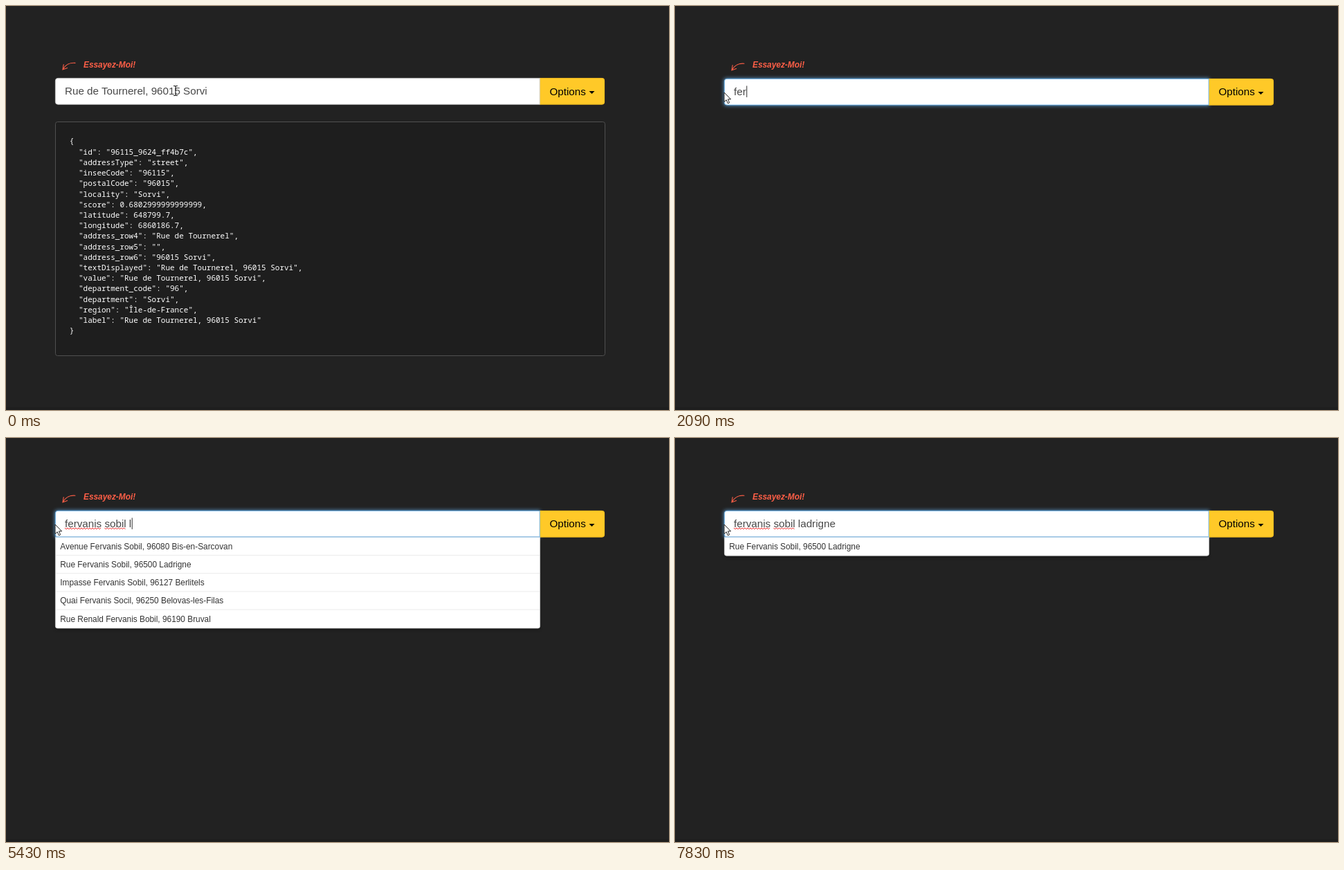
These frames come from a looping animation (958x584 px, 8000 ms). An HTML page:

```html
<!DOCTYPE html>
<html lang="fr">
<head>
<meta charset="utf-8">
<title>Recherche d'adresse</title>
<style>
html, body { margin: 0; width: 100%; height: 100%; overflow: hidden; background: #222; }
svg { display: block; width: 958px; height: 584px; }
text { font-family: "Liberation Sans", Arial, sans-serif; white-space: pre; }
.field { font-size: 15.2px; }
.row { font-size: 11.87px; fill: #333; }
.code { font: 11px "Noto Sans Mono", "DejaVu Sans Mono", monospace; fill: #fff; }
.hint { font-size: 11.87px; font-weight: bold; font-style: italic; fill: #ff5f47; }
</style>
</head>
<body>
<svg viewBox="0 0 958 584">
  <defs>
    <filter id="blur" x="-5%" y="-60%" width="110%" height="220%"><feGaussianBlur stdDeviation="2.6"/></filter>
    <clipPath id="selClip"><rect id="selArea" y="113" height="18"/></clipPath>
  </defs>
  <rect width="958" height="584" fill="#222"/>
  <rect y="580" width="958" height="4" fill="#1e1e1e"/>

  <g id="result">
    <rect x="71.5" y="167.5" width="794" height="338" rx="3" fill="#1e1e1e" stroke="#505050"/>
    <g id="json"></g>
  </g>

  <g id="header">
    <path d="M100 82.4C93 81.6 86 84.5 82.4 91.6M83.2 84.6L82 92L88.6 89.6" fill="none" stroke="#ff5f47" stroke-width="1.1" stroke-linecap="round"/>
    <text class="hint" x="112" y="88.6">Essayez-Moi!</text>
    <path id="glow" d="M75 104H771V142.5H75Q71 142.5 71 138.5V108Q71 104 75 104Z" fill="#66afe9" stroke="#66afe9" stroke-width="2" opacity=".7" filter="url(#blur)"/>
    <path d="M771 104H861Q865 104 865 108V138.5Q865 142.5 861 142.5H771Z" fill="#ffc928"/>
    <path d="M771 104.4H861Q864.6 104.4 864.6 108V138.5Q864.6 142.1 861 142.1H771" fill="none" stroke="#efb71c" stroke-width=".8"/>
    <text class="field" x="785.5" y="128.5">Options</text>
    <path d="M842.5 123H850.5L846.5 127Z"/>
    <path id="box" d="M75 104.4H771.2V142.2H75Q71.4 142.2 71.4 138.5V108Q71.4 104.4 75 104.4Z" fill="#fff"/>
    <rect id="selBack" y="113.5" height="17.5" fill="#333"/>
    <text id="typed" class="field" x="85" y="127.8" fill="#484848"></text>
    <text id="selText" class="field" x="85" y="127.8" fill="#fff" clip-path="url(#selClip)"></text>
    <path id="waves" fill="none" stroke="#f02020" stroke-width="1"/>
    <rect id="caret" y="114.5" width="1" height="16.5" fill="#333"/>
  </g>

  <g id="menu">
    <rect id="menuShade" x="72" y="146" width="699" fill="#000" opacity=".35" filter="url(#blur)"/>
    <path id="menuBox" fill="#fff" stroke="#ccc" stroke-width=".8"/>
    <path d="M71 143H772" stroke="#7db9e8"/>
    <path id="rules" stroke="#ebebeb" fill="none"/>
    <g id="rows"></g>
  </g>

  <path id="ibeam" d="M-3 -7H-1L0 -6L1 -7H3M0 -6V6M-3 7H-1L0 6L1 7H3" fill="none" stroke="#222" stroke-width="1.1"/>
  <path id="arrow" d="M0 0V13.6L3.2 10.7L5.4 15.8L7.6 14.8L5.5 9.8H9.6Z" fill="#fff" stroke="#222" stroke-width="1"/>
</svg>
<script>
const LOOP = 8000, LEFT = 85, ROW = 26.2;
const $ = id => document.getElementById(id);
const show = (id, on) => $(id).setAttribute('visibility', on ? 'visible' : 'hidden');
const set = (id, attrs) => { for (const k in attrs) $(id).setAttribute(k, attrs[k]); };
const pen = document.createElement('canvas').getContext('2d');
pen.font = '15.2px "Liberation Sans", Arial, sans-serif';
const width = s => pen.measureText(s).width;

function addText(parent, cls, x, y) {
  const el = document.createElementNS('http://www.w3.org/2000/svg', 'text');
  el.setAttribute('class', cls);
  el.setAttribute('x', x);
  el.setAttribute('y', y);
  $(parent).append(el);
  return el;
}

const street = 'Rue de Tournerel', city = '96015 Sorvi', address = `${street}, ${city}`;
const record = {
  id: '96115_9624_ff4b7c', addressType: 'street', inseeCode: '96115', postalCode: '96015',
  locality: 'Sorvi', score: 0.6802999999999999, latitude: 648799.7, longitude: 6860186.7,
  address_row4: street, address_row5: '', address_row6: city,
  textDisplayed: address, value: address, department_code: '96', department: 'Sorvi',
  region: 'Île-de-France', label: address
};
JSON.stringify(record, null, 2).split('\n').forEach((line, i) => {
  addText('json', 'code', 91.8, 199.4 + i * 15.22).textContent = line;
});

const firstList = [
  '96570 Fervas', 'Ferva Bérida, 96300 Fodris', 'Ferva, 96950 Lune-Cap-Torrel',
  'Ferva, 99290 Maudrenart', 'Ferva Pardo, 96293 Mécibors-sur-Balodunet'
];
const avenue = 'Avenue Fervanis Sobil, 96080 Bis-en-Sarcovan';
const rue = 'Rue Fervanis Sobil, 96500 Ladrigne';
const others = ['Impasse Fervanis Sobil, 96127 Berlitels', 'Quai Fervanis Socil, 96250 Belovas-les-Filas'];
const last = 'Rue Renald Fervanis Bobil, 96190 Bruval';
const lists = [
  [0, []],
  [2320, firstList],
  [4340, [avenue, rue, ...others, 'Avenue Renald Fervanis Sobil, 96830 Bolnicade']],
  [5430, [avenue, rue, ...others, last]],
  [6180, [rue, avenue, ...others, last]],
  [7830, [rue]]
];
const rowTexts = firstList.map((_, i) => addText('rows', 'row', 78.3, 160.7 + i * ROW));

const query = 'fervanis sobil ladrigne';
const keyTimes = [
  1470, 1540, 1940, 2130, 2320, 2640, 2870, 3100, 3330, 3560, 3730, 4110,
  4225, 4340, 4650, 5430, 5720, 5870, 6020, 6500, 6670, 6970, 7200
];
// Pointer path, one [x, y] per 85 ms tick.
const drag = [[262, 123], [286, 123], [298, 124], [262, 125], [200, 127], [132, 129], [84, 130], [66, 128], [71, 125]];

const latest = (steps, t) => steps.filter(s => s[0] <= t).pop()[1];

function wave(text, from, to) {
  const x0 = LEFT + width(text.slice(0, from)), x1 = LEFT + width(text.slice(0, to));
  let d = `M${x0} 129`;
  for (let x = x0 + 2, i = 1; x <= x1; x += 2, i++) d += `L${x} ${i % 2 ? 131 : 129}`;
  return d;
}

function drawPointer(t, tick) {
  const [x, y] = tick < 0 ? [245, 122.5] : drag[tick];
  const inField = x > 72;
  show('ibeam', inField);
  show('arrow', !inField);
  set(inField ? 'ibeam' : 'arrow', { transform: `translate(${x} ${y})` });
  return x;
}

function drawSelection(on, x) {
  let start = 0;
  if (x > LEFT) while (start < address.length && LEFT + width(address.slice(0, start + 0.5 | 0)) < x - 4) start++;
  const left = LEFT + width(address.slice(0, start));
  const span = { x: left, width: on ? Math.max(0, LEFT + width(address) - left + 0.4) : 0 };
  set('selBack', span);
  set('selArea', span);
  $('selText').textContent = on ? address : '';
}

function drawMenu(list) {
  show('menu', list.length);
  const bottom = 144 + ROW * list.length;
  set('menuBox', { d: `M71.4 143H771.6V${bottom - 3}Q771.6 ${bottom} 768.6 ${bottom}H74.4Q71.4 ${bottom} 71.4 ${bottom - 3}Z` });
  set('menuShade', { height: Math.max(0, bottom - 144) });
  set('rules', { d: list.slice(1).map((_, i) => `M72 ${143.3 + ROW * (i + 1)}H771`).join('') });
  rowTexts.forEach((el, i) => { el.textContent = list[i] || ''; });
}

function draw(t) {
  const tick = Math.min(8, Math.floor((t - 80) / 85));
  const count = keyTimes.filter(k => k <= t).length;
  const typing = count > 0, focused = tick >= 2, searching = t >= 1940;
  const text = typing ? query.slice(0, count) : address;

  show('result', !searching);
  show('glow', focused);
  set('box', { stroke: focused ? '#66afe9' : '#ccc', 'stroke-width': 0.9 });
  set('header', { transform: `translate(0 ${searching ? 0.9 : 0})` });
  $('typed').textContent = text;

  const x = drawPointer(t, tick);
  drawSelection(!typing && tick >= 3, x);

  let d = '';
  if (!typing && focused) d = wave(address, 7, 16);
  if (t >= 3330) d += wave(query, 0, 8);
  if (t >= 4880) d += wave(query, 9, 14);
  set('waves', { d });

  show('caret', typing && t < 7750);
  set('caret', { x: LEFT + width(text) + 0.5 });
  drawMenu(latest(lists, t));
}

const begin = performance.now();
function frame() {
  draw((performance.now() - begin) % LOOP);
  requestAnimationFrame(frame);
}
draw(0);
requestAnimationFrame(frame);
</script>
</body>
</html>
```
